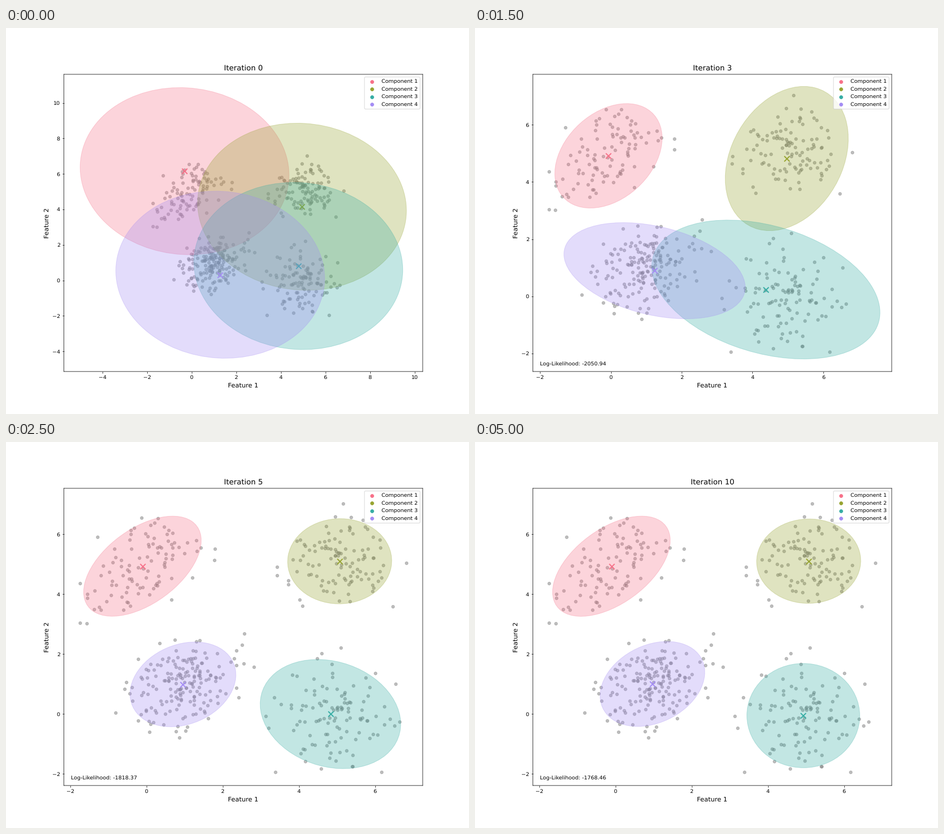
Recreate the animation shown at these times as a matplotlib script. Size 820 by 683 pixels, loop 5.5 s.

```python
import numpy as np
import matplotlib.pyplot as plt
from matplotlib.animation import FuncAnimation
from matplotlib.patches import Ellipse

W, H, DPI = 820, 683, 205 / 3
STEPS = 10
COLORS = ["#f77189", "#97a431", "#36ada4", "#a48cf4"]

# Size, mean, standard deviations and correlation of each cluster
CLUSTERS = [(100, (-0.11, 4.93), (0.778, 0.836), 0.515),
            (110, (5.07, 5.10), (0.685, 0.704), 0.01),
            (112, (4.93, -0.06), (0.738, 0.876), 0.0),
            (178, (0.97, 1.00), (0.687, 0.709), 0.28)]
LOW, HIGH = (-1.74, -1.94), (6.82, 7.08)  # extent of the data
START = [(-0.32, 6.155), (4.95, 4.15), (4.785, 0.81), (1.28, 0.32)]
LOGLIK = [-2363.65, -2164.46, -2050.94, -1914.83, -1818.37,
          -1774.85, -1769.02, -1768.49, -1768.46, -1768.46]

# Keep lines and glyphs at their exact, unrounded positions
plt.rcParams.update({"path.snap": False, "text.hinting": "none"})


def sample(rng, n, mean, sd, rho):
    """Normal points whose mean and covariance are exactly those given."""
    z = rng.normal(size=(2 * n, 2))
    z = z[np.hypot(z[:, 0], z[:, 1]) < 2.8][:n]
    z -= z.mean(axis=0)
    z = z @ np.linalg.inv(np.linalg.cholesky(np.cov(z.T, bias=True))).T
    cov = np.outer(sd, sd) * [[1, rho], [rho, 1]]
    return mean + z @ np.linalg.cholesky(cov).T


def density(x, mean, cov):
    d = x - mean
    q = np.sum(d @ np.linalg.inv(cov) * d, axis=1)
    return np.exp(-q / 2) / (2 * np.pi * np.sqrt(np.linalg.det(cov)))


def em_step(x, weights, means, covs):
    p = np.array([w * density(x, m, c) for w, m, c in zip(weights, means, covs)])
    r = p / p.sum(axis=0)
    total = r.sum(axis=1)
    means = r @ x / total[:, None]
    covs = [(rk[:, None] * (x - m)).T @ (x - m) / t
            for rk, m, t in zip(r, means, total)]
    return total / len(x), means, covs


rng = np.random.default_rng(42)
points = np.clip(np.vstack([sample(rng, *c) for c in CLUSTERS]), LOW, HIGH)

states = [(np.full(4, 0.25), np.array(START), [np.cov(points.T)] * 4)]
for _ in range(STEPS):
    states.append(em_step(points, *states[-1]))

# The small surplus keeps the pixel size from rounding down
fig, ax = plt.subplots(figsize=((W + 0.005) / DPI, (H + 0.005) / DPI), dpi=DPI)


def draw_component(mean, cov, color, label):
    vals, vecs = np.linalg.eigh(cov)
    minor, major = 4 * np.sqrt(vals)
    angle = np.degrees(np.arctan2(vecs[1, 1], vecs[0, 1]))
    ax.add_patch(Ellipse(mean, major, minor, angle=angle, color=color, alpha=0.3))
    ax.scatter(*mean, c=color, marker="x", s=100, linewidths=2)
    ax.scatter([], [], c=color, label=label)


def update(i):
    ax.clear()
    ax.scatter(points[:, 0], points[:, 1], c="gray", s=30, alpha=0.5)
    _, means, covs = states[i]
    for k, (mean, cov, color) in enumerate(zip(means, covs, COLORS), 1):
        draw_component(mean, cov, color, f"Component {k}")
    ax.update_datalim([LOW, HIGH])
    ax.autoscale_view()
    ax.set_title(f"Iteration {i}", fontsize=14)
    ax.set_xlabel("Feature 1", fontsize=12, labelpad=5)
    ax.set_ylabel("Feature 2", fontsize=12)
    if i:
        ax.text(0.02, 0.02, f"Log-Likelihood: {LOGLIK[i - 1]:.2f}",
                transform=ax.transAxes, fontsize=10)
    ax.legend(loc="upper right")
    return []


anim = FuncAnimation(fig, update, frames=STEPS + 1, interval=500, repeat=True)
plt.show()
```
